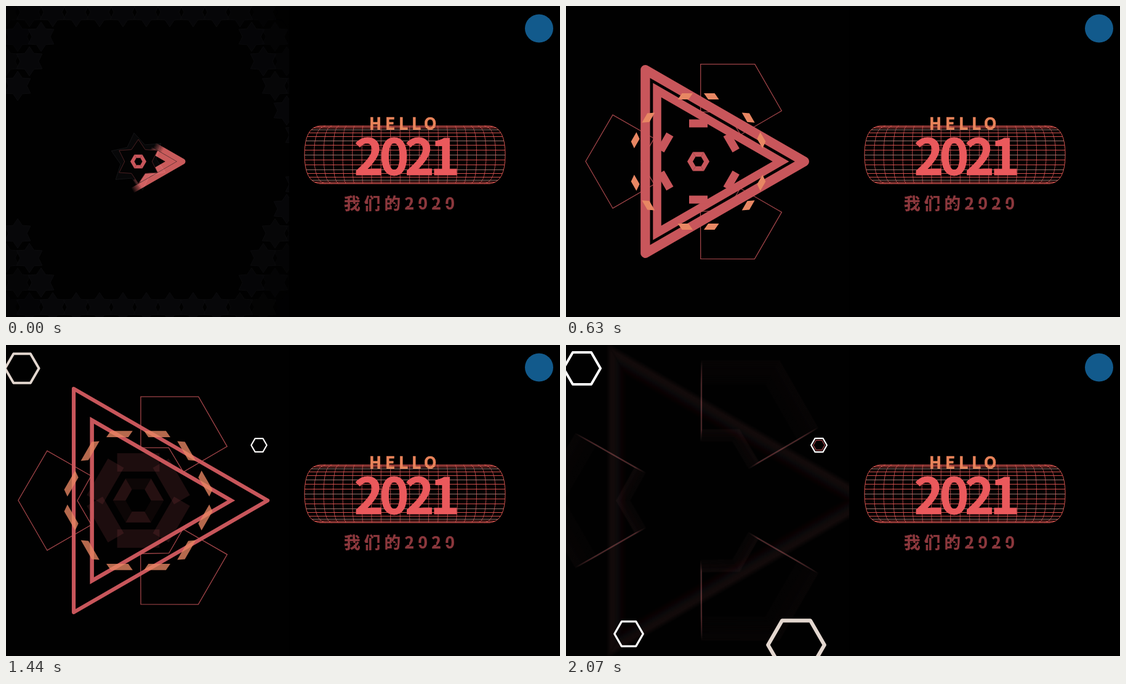
Recreate the animation shown at these times as an HTML page with a canvas. Size 900 px wide and 506 px high, loop 2160 ms.

```html
<!DOCTYPE html>
<html lang="zh">
<head>
<meta charset="utf-8">
<style>
html, body { margin: 0; width: 900px; height: 506px; overflow: hidden; background: #000; }
canvas, svg { position: absolute; left: 0; top: 0; }
text { font-family: "Noto Sans CJK SC", "Noto Sans CJK", "Noto Sans", sans-serif; font-weight: 700; stroke: currentColor; fill: currentColor; }
</style>
</head>
<body>
<canvas id="stage" width="900" height="506"></canvas>
<svg width="900" height="506">
  <circle cx="866" cy="36.5" r="23" fill="#125a8c"/>
  <text x="589.8" y="201" font-size="27" letter-spacing="5.4" color="#e8835a" stroke-width=".5">HELLO</text>
  <text x="565.4" y="275" font-size="81" letter-spacing="-6.5" color="#ea595c" stroke-width=".9">2021</text>
  <text x="549" y="331" font-size="26.5" letter-spacing="6.3" color="#8c383d" stroke-width=".4">我们的2020</text>
  <!-- stencil cuts through the subtitle -->
  <path d="M559 323.5H722" stroke="#000" stroke-width="3" stroke-dasharray="8 14"/>
</svg>
<script>
const g = document.getElementById('stage').getContext('2d');
const LOOP = 2160, STEP = 90, EXIT = 1620, CX = 215, CY = 253, TAU = Math.PI * 2;
const RED = '#c8565b', ORANGE = '#e88763';

// Progress 0..1 between two times, and the curves built on it
const span = (t, a, b) => Math.min(1, Math.max(0, (t - a) / (b - a)));
const lerp = (a, b, p) => a + (b - a) * p;
const smooth = p => p * p * (3 - 2 * p);
const settle = (t, tau) => 1 - Math.exp(-t / tau);

function poly(points, close = true) {
  g.beginPath();
  points.forEach(([x, y]) => g.lineTo(x, y));
  if (close) g.closePath();
}

const ring = (n, r, turn = 0, x = 0, y = 0) => Array.from({ length: n }, (_, i) => {
  const a = turn + i * TAU / n;
  return [x + r * Math.cos(a), y + r * Math.sin(a)];
});

function star(x, y, r, turn, fill, line) {
  poly(ring(12, r, turn).map(([dx, dy], i) => {
    const q = i % 2 ? 0.62 : 1;
    return [x + dx * q, y + dy * q];
  }));
  g.fillStyle = fill;
  g.strokeStyle = line;
  g.lineWidth = 1;
  g.fill();
  g.stroke();
}

function repeat(n, draw) {
  for (let i = 0; i < n; i++) {
    g.save();
    g.rotate(i * TAU / n);
    draw(i);
    g.restore();
  }
}

// A wire barrel: bowed meridians and level lines that crowd at the rims
function grid() {
  const side = (u, flip = 1) => {
    const mid = 648 + 163 * u, end = mid - 25 * u ** 3;
    g.lineTo(end, 242 - 47 * flip);
    g.quadraticCurveTo(mid, 242 - 45 * flip, mid, 242);
    g.quadraticCurveTo(mid, 242 + 45 * flip, end, 242 + 47 * flip);
  };
  g.save();
  g.lineWidth = 1;
  g.strokeStyle = '#b5484a';
  for (let k = -9.5; k < 10; k++) {
    g.beginPath();
    side(k / 10.5);
    g.stroke();
  }
  g.beginPath();
  side(1);
  side(-1, -1);
  g.closePath();
  g.strokeStyle = '#d9554f';
  g.stroke();
  g.clip();
  for (let k = -8; k <= 8; k++) {
    g.fillStyle = k % 3 ? '#cf504c' : '#9a736c';
    g.fillRect(485, Math.round(242 + 47 * Math.sin(k * TAU / 36)), 326, 1);
  }
  g.restore();
}

// Dark tiles clearing outwards past a hexagonal edge
function tiles(t) {
  if (t > 180) return;
  const edge = 228 + t * 0.5;
  for (let j = -1; j < 14; j++)
    for (let i = -1; i < 13; i++) {
      const x = i * 38 + (j % 2) * 19, y = j * 40 + 10;
      const dx = Math.abs(x - CX), dy = Math.abs(y - CY);
      const d = Math.max(dy, dx * 0.866 + dy * 0.5) - edge;
      if (d < 0) continue;
      g.globalAlpha = 1 - span(d, 0, 110);
      star(x, y, 24, TAU / 12, '#08080a', '#0d0d0f');
    }
}

function panels(t, alpha) {
  const s = 1.015 - 0.81 / (1 + t / 260) ** 1.8;
  const shape = [[4, -171], [99, -171], [146, -89], [74, -47], [50, -87], [4, -87]];
  g.globalAlpha = alpha * 0.8 * span(t, 0, STEP);
  g.strokeStyle = RED;
  g.lineWidth = 1.3;
  g.lineJoin = 'miter';
  repeat(3, () => {
    poly(shape.map(([x, y]) => [x * s, y * s]));
    g.stroke();
  });
}

// Triangle drawn on from its right tip: back along the top, forward along the bottom
function triangle(t, r, width, join, alpha) {
  const [tip, low, high] = ring(3, r);
  const middle = [-r / 2, 0], length = r * Math.sqrt(27);
  const back = lerp(0.12, 0.5, span(t, 0, 470)), fore = lerp(0.23, 0.5, span(t, 0, 540));
  g.strokeStyle = RED;
  g.lineWidth = width;
  g.lineJoin = join;
  if (fore === 0.5) {
    g.globalAlpha = alpha;
    poly([tip, low, high]);
    g.stroke();
    return;
  }
  // Overlaid passes of different length soften the ends
  const n = 10;
  g.save();
  g.globalCompositeOperation = 'lighter';
  g.globalAlpha = alpha / n;
  for (let i = 0; i < n; i++) {
    const d = 0.04 * (i / (n - 1) - 0.5);
    const a = Math.max(0, 0.5 - back - d), b = Math.min(1, 0.5 + fore + d);
    g.setLineDash([0, a * length, (b - a) * length, length]);
    poly([middle, high, tip, low, middle], false);
    g.stroke();
  }
  g.restore();
}

function triangles(t, alpha) {
  const gone = span(t, EXIT, LOOP - STEP);
  const width = (full, end) => lerp(lerp(9, full, span(t, 0, 450)), end, smooth(span(t, 450, EXIT)));
  triangle(t, 72 + 150 * settle(t, 570), width(16, 5.5), 'round', alpha * (1 - 0.6 * gone ** 2));
  triangle(t, 53 + 100 * settle(t, 380), width(14, 6), 'miter', alpha * (1 - gone) ** 1.2);
}

// Panels and triangles, smeared by a zoom blur on the way out
function frame(t) {
  const z = span(t, EXIT, LOOP - STEP), n = z ? 28 : 1;
  const near = 1 - 0.36 * z + 0.46 * z * z, far = 1 + 0.33 * z ** 2.8;
  g.save();
  if (z) g.globalCompositeOperation = 'lighter';
  for (let i = 1; i <= n; i++) {
    const alpha = (1 - 0.5 * z * z) * (i + n / 2) / (n * n + n / 2 + n * 0.5 - 0.5 * n) * (z ? 1 : 1);
    const s = lerp(near, far, i / n);
    g.save();
    g.scale(s, s);
    panels(t, alpha);
    triangles(t, alpha);
    g.restore();
  }
  g.restore();
}

function dashes(t) {
  const grow = 35 * span(t, 540, 720), s = 1 + 0.025 * span(t, 720, EXIT);
  if (!grow) return;
  g.save();
  g.scale(s, s);
  g.globalAlpha = lerp(1, 0.34, span(t, 1350, EXIT)) * (1 - span(t, EXIT, EXIT + STEP));
  g.fillStyle = t > 1440 ? RED : ORANGE;
  repeat(6, () => {
    for (const m of [-1, 1]) {
      poly([[9 * m, -111], [(9 + grow) * m, -111], [(16 + grow) * m, -101], [16 * m, -101]]);
      g.fill();
    }
  });
  g.restore();
}

// Bars and the hexagonal nut, which dim one after another and swell away
function blocks(t) {
  const out = 1 - span(t, EXIT, EXIT + STEP);
  const grow = 1 + 3.6 * span(t, 1170, EXIT) ** 2;
  const dim = (early, end) => out * lerp(1, end, span(t, early ? 1080 : 1200, early ? 1200 : 1440));
  const s = grow * span(t, 390, 630);
  g.fillStyle = RED;
  repeat(6, i => {
    g.globalAlpha = dim(i === 3, 0.14);
    g.fillRect(-15 * s, -62 - 6.5 * s, 30 * s, 13 * s);
  });
  const r = grow * lerp(13, 18, span(t, 0, 180));
  const outer = ring(6, r), inner = ring(6, r / 2);
  for (let i = 0; i < 6; i++) {
    const j = (i + 1) % 6;
    g.globalAlpha = dim(i === 1 || i === 3, i % 2 ? 0.18 : 0.06);
    poly([outer[i], outer[j], inner[j], inner[i]]);
    g.fill();
  }
}

function hexagon(x, y, r, age, width, color) {
  const r2 = r * (1 - 0.35 * Math.exp(-age / 120)) - width / 2;
  g.strokeStyle = color;
  g.lineWidth = width;
  g.lineJoin = 'round';
  poly(ring(6, r2, 0, x, y));
  g.stroke();
}

function hexes(t) {
  for (const [x, y, r, start] of [[411, 163, 14, 1080], [26, 38, 32, 1260], [102, 470, 25, 1530], [374, 488, 53, 1890]]) {
    const age = t - start;
    if (age <= 0) continue;
    const tint = Math.exp(-(age + 20) / 90);
    g.globalAlpha = 1 - tint;
    hexagon(x, y, r, age, 0.8 + r * 0.1, `rgb(255,${255 - 120 * tint},${255 - 200 * tint})`);
  }
  g.globalAlpha = 0.75;
  if (t > 1980) hexagon(411, 163, 12, t - 1980, 1.4, RED);
}

function draw(now) {
  const t = Math.floor(now % LOOP / STEP) * STEP;
  g.globalAlpha = 1;
  g.fillStyle = '#000';
  g.fillRect(0, 0, 900, 506);
  grid();
  g.save();
  g.beginPath();
  g.rect(0, 0, 460, 506);
  g.clip();
  g.fillStyle = '#010101';
  g.fillRect(0, 0, 460, 506);
  tiles(t);
  g.translate(CX, CY);
  g.globalAlpha = 1;
  if (t < STEP) star(0, 0, 47, -1.72, '#070708', '#141416');
  frame(t);
  g.globalAlpha = 1;
  if (t < STEP) star(0, 0, 36, -TAU / 4, '#030303', '#4a2022');
  dashes(t);
  blocks(t);
  g.translate(-CX, -CY);
  hexes(t);
  g.restore();
}

let origin;
function tick(now) {
  origin ??= now;
  draw(now - origin);
  requestAnimationFrame(tick);
}
requestAnimationFrame(tick);
</script>
</body>
</html>
```
